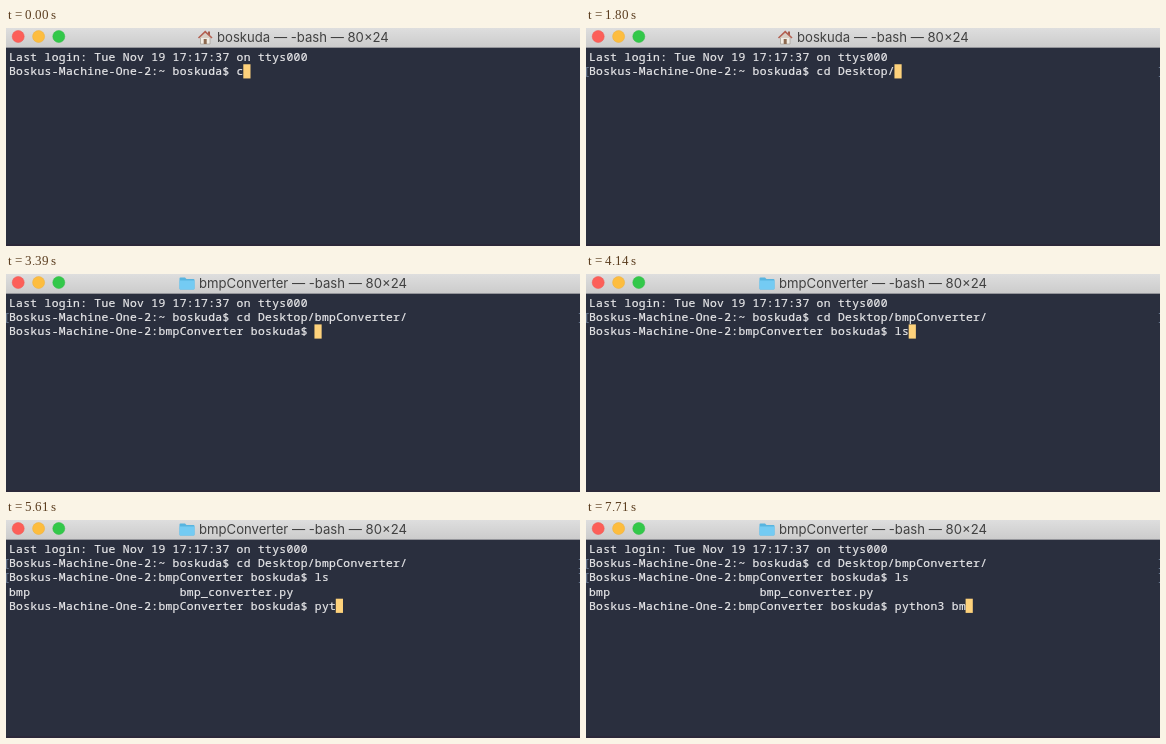
An HTML page that plays this animation: 574x218 px, repeating every 8000 ms.

```html
<!DOCTYPE html>
<html lang="en">
<head>
<meta charset="utf-8">
<title>Terminal</title>
<style>
  html, body { margin: 0; width: 100%; height: 100%; overflow: hidden; background: #2a2f3e; }
  svg { display: block; width: 574px; height: 218px; }
  .title { font: 13.13px Inter, "Liberation Sans", sans-serif; fill: #414141; }
  .row, .mark { font: 11.3px "Noto Sans Mono", "DejaVu Sans Mono", monospace; white-space: pre; }
  .row { letter-spacing: 0.335px; fill: #e8e8ea; stroke: #e8e8ea; stroke-width: .22px; }
  .mark { fill: #74859e; }
  .off { display: none; }
</style>
</head>
<body>
<svg viewBox="0 0 574 218">
  <defs>
    <linearGradient id="bar" x2="0" y2="1">
      <stop offset="0" stop-color="#dedede"/>
      <stop offset="1" stop-color="#cbcbcb"/>
    </linearGradient>
  </defs>
  <rect width="574" height="218" fill="#2a2f3e"/>
  <rect y="216" width="574" height="2" fill="#2b2839"/>
  <rect width="574" height="20" fill="url(#bar)"/>
  <rect y="19" width="574" height="1" fill="#94959a"/>
  <g stroke-width=".5">
    <circle cx="12.2" cy="8.5" r="6" fill="#fc5f59" stroke="#ee554f"/>
    <circle cx="32.6" cy="8.5" r="6" fill="#fdbd3f" stroke="#edae39"/>
    <circle cx="52.8" cy="8.5" r="6" fill="#33c84a" stroke="#2eba42"/>
  </g>

  <g id="home">
    <path d="M194.5 9.5h9.5v6.5h-9.5z" fill="#f1ede5" stroke="#9b9387" stroke-width=".6"/>
    <path d="M202 3.5h2v4h-2z" fill="#a35c4b"/>
    <path d="M192.5 10 199.2 3.6 206 10" fill="#d8cfc4" stroke="#b46152" stroke-width="1.6"/>
    <path d="M197.7 11h3v5h-3z" fill="#8d6a50"/>
    <text class="title" x="211" y="14"></text>
  </g>
  <g id="folder">
    <path d="M173.5 4.5q0-1 1-1h4.5l1.5 1.5h7q1 0 1 1v8.5q0 1-1 1h-13q-1 0-1-1z" fill="#58b4df"/>
    <path d="M173.5 6.5h15v8q0 1-1 1h-13q-1 0-1-1z" fill="#74cbf3"/>
    <text class="title" x="193" y="14"></text>
  </g>

  <rect id="cursor" width="7.2" height="14.2" fill="#fed27b"/>
  <g id="screen"></g>
</svg>
<script>
const LOOP = 8000, CELL = 7.115, PITCH = 14.15, LEFT = 3, TOP = 22.1;
const user = "boskuda", host = "Boskus-Machine-One-2", dir = "bmpConverter";
const prompt = place => `${host}:${place} ${user}$ `;
const homeLine = prompt("~"), dirLine = prompt(dir);

// [start time, text] of each command as it is typed
const cdKeys = [
  [0, "c"], [30, "cd"], [180, "cd "], [690, "cd D"], [870, "cd De"],
  [1050, "cd Des"], [1440, "cd Desktop/"], [1980, "cd Desktop/b"],
  [2190, "cd Desktop/bm"], [2340, "cd Desktop/bmpConverter/"]
];
const lsKeys = [[3930, "l"], [4020, "ls"]];
const pyKeys = [
  [5190, "p"], [5340, "py"], [5490, "pyt"], [5790, "pyth"], [6390, "pytho"],
  [6570, "python"], [6780, "python3"], [7050, "python3 "],
  [7440, "python3 b"], [7710, "python3 bm"]
];
const MARK_CD = 960, ENTER_CD = 2790, PROMPT_CD = 2820, TITLE_CD = 2850, ENTER_LS = 4170;

const $ = id => document.getElementById(id);
const typed = (keys, t) => keys.reduce((s, [at, text]) => t >= at ? text : s, "");

function addText(cls, x, row) {
  const el = document.createElementNS("http://www.w3.org/2000/svg", "text");
  el.setAttribute("class", cls);
  el.setAttribute("x", x);
  el.setAttribute("y", TOP + row * PITCH + 11);
  $("screen").append(el);
  return el;
}

const rows = [0, 1, 2, 3, 4].map(i => addText("row", LEFT, i));
const marks = [1, 2].map(i => ["[", "]"].map((c, side) => {
  const el = addText("mark", side ? 571.3 : -2.5, i);
  el.textContent = c;
  return el;
}));

$("home").lastElementChild.textContent = `${user} — -bash — 80×24`;
$("folder").lastElementChild.textContent = `${dir} — -bash — 80×24`;

function linesAt(t) {
  const lines = ["Last login: Tue Nov 19 17:17:37 on ttys000", homeLine + typed(cdKeys, t)];
  if (t >= ENTER_CD) lines.push(t < PROMPT_CD ? "" : dirLine + typed(lsKeys, t));
  if (t >= ENTER_LS) lines.push("bmp".padEnd(24) + "bmp_converter.py", dirLine + typed(pyKeys, t));
  return lines;
}

function draw(t) {
  const lines = linesAt(t), last = lines.length - 1;
  rows.forEach((el, i) => {
    const s = lines[i] || "";
    if (el.textContent !== s) el.textContent = s;
  });
  $("cursor").setAttribute("x", LEFT - 0.5 + lines[last].length * CELL);
  $("cursor").setAttribute("y", TOP + last * PITCH);
  [MARK_CD, ENTER_LS].forEach((at, i) =>
    marks[i].forEach(el => el.classList.toggle("off", t < at)));
  $("home").classList.toggle("off", t >= TITLE_CD);
  $("folder").classList.toggle("off", t < TITLE_CD);
}

const start = performance.now();
function tick() {
  draw((performance.now() - start) % LOOP);
  requestAnimationFrame(tick);
}
draw(0);
tick();
</script>
</body>
</html>
```
